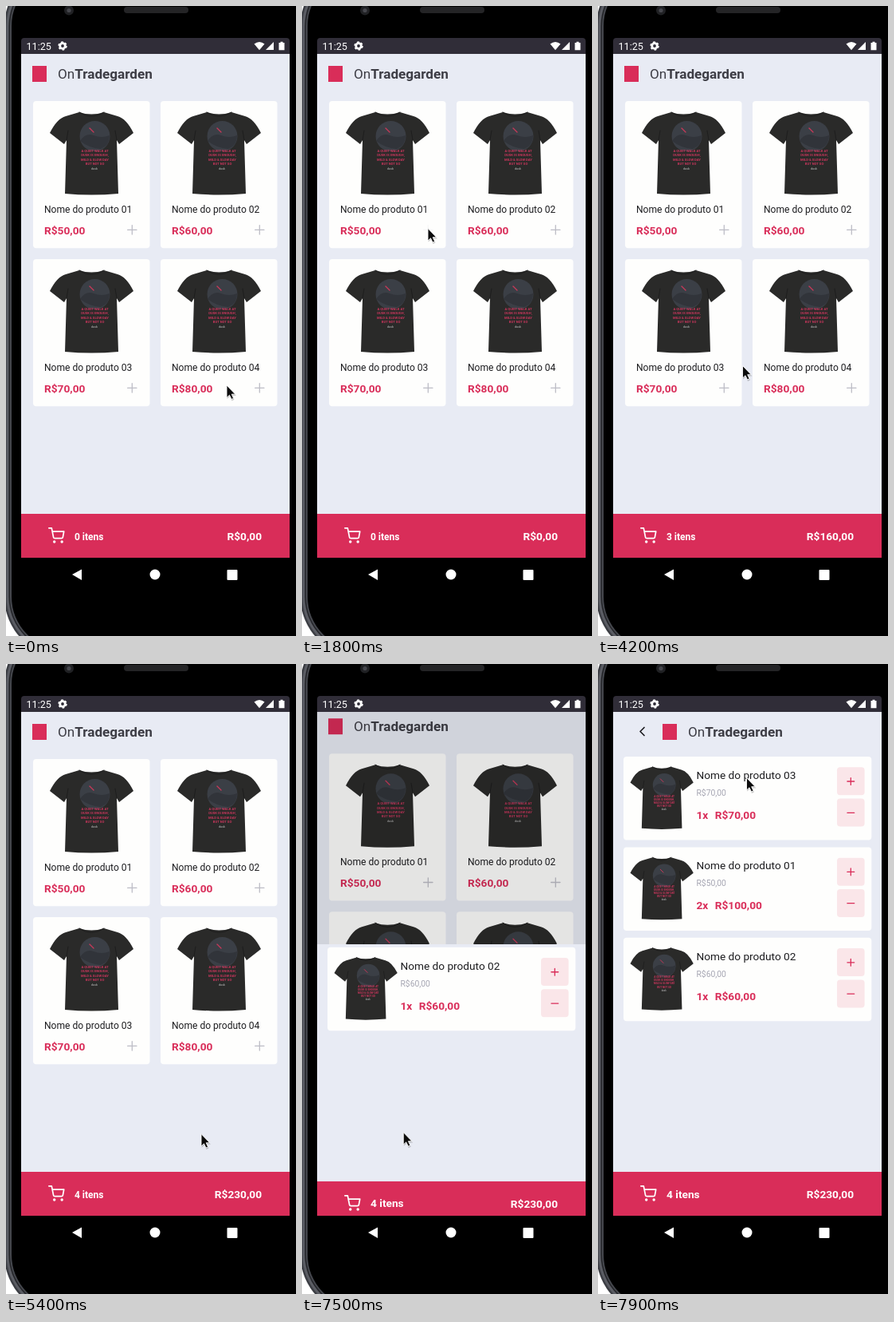
An HTML page for the animation above (8 s loop, 364x789 px).

```html
<!DOCTYPE html>
<html lang="pt-BR">
<head>
<meta charset="utf-8">
<title>Loja</title>
<style>
html, body { margin: 0; width: 100%; height: 100%; overflow: hidden; background: #fff; }
#stage { display: block; width: 364px; height: 789px; font-family: Roboto, sans-serif; }
.bold { font-weight: 700; }
.red { fill: #d92d59; }
.white { fill: #fff; }
.name { fill: #1d1d20; }
.line { fill: none; stroke-linecap: round; stroke-linejoin: round; }
</style>
</head>
<body>
<svg id="stage" viewBox="0 0 364 789" xmlns="http://www.w3.org/2000/svg"></svg>
<script>
const RED = '#d92d59', PAGE = '#e8ebf4', CARD = '#fefefd';
const LOOP = 8000, STEP = 100, LEG = 200;
const VIEW = { x: 19, y: 60, w: 337, h: 631 };

// Each stroke leaves at `start` and passes one point per LEG
const rest = [276.5, 474.5];
const strokes = [
  { start: 700, points: [[242, 414], [176, 311], [157.5, 278]] },
  { start: 2800, points: [[197, 333], [236.5, 309], [281, 287], [320, 282]] },
  { start: 4000, points: [[181, 450], [154, 474]] },
  { start: 5000, points: [[229, 540], [244.5, 588], [274, 661], [271, 661], [274, 640], [262, 470],
    [243, 387], [232, 437], [120.5, 612], [89, 673]] },
  { start: 7400, points: [[164.5, 499], [190, 220], [182, 64]] }
];
const taps = [
  { product: 0, down: 1800, up: 2300 },
  { product: 0, down: 2500, up: 2700 },
  { product: 1, down: 3900, up: 4200 },
  { product: 2, down: 4700, up: 5000 }
];
const cartPress = 7300, openCart = 7430, openTime = 425, countDelay = 200;

const price = i => 50 + 10 * i;
const money = n => `R$${n},00`;
const text = (x, y, size, cls, body, extra = '') =>
  `<text x="${x}" y="${y}" font-size="${size}" class="${cls}" ${extra}>${body}</text>`;
const box = (x, y, w, h, fill, r = 0) =>
  `<rect x="${x}" y="${y}" width="${w}" height="${h}" rx="${r}" fill="${fill}"/>`;
const cross = (x, y, r, color, upright = true) =>
  `<path class="line" stroke="${color}" stroke-width="1.3" d="M${x - r} ${y}h${2 * r}${upright ? `M${x} ${y - r}v${2 * r}` : ''}"/>`;
const shirt = (x, y, scale) => `<use href="#shirt" transform="translate(${x} ${y}) scale(${scale})"/>`;

const brand = x => box(x, 75, 18, 20, RED) +
  `<text x="${x + 32}" y="90.5" font-size="17.1" fill="#3d3d45">On<tspan class="bold">Tradegarden</tspan></text>`;

function footer(id, size) {
  return box(19, 636, 337, 60, RED) + `<g id="${id}Button">
    <g class="line" transform="translate(53 653) scale(.857)" stroke="#fff" stroke-width="2">
      <circle cx="9" cy="21" r="1"/><circle cx="20" cy="21" r="1"/>
      <path d="M1 1h4l2.68 13.39a2 2 0 0 0 2 1.61h9.72a2 2 0 0 0 2-1.61L23 6H6"/></g>` +
    text(86, 668.5, size, 'bold white', '4 itens', `id="${id}Items"`) + '</g>' +
    text(321, 669, 13.7, 'bold white', money(230), `id="${id}Total" text-anchor="end"`);
}

function product(i) {
  const x = 34 + i % 2 * 160, y = 119 + (i >> 1) * 198;
  return box(x, y, 146.5, 184.3, CARD, 4) + shirt(x + 21, y + 13, 1) +
    text(x + 14, y + 140, 12.05, 'name', `Nome do produto 0${i + 1}`) +
    text(x + 14, y + 167, 13.7, 'bold red', money(price(i))) +
    `<g id="plus${i}">${cross(x + 124.3, y + 161.3, 5.7, '#bdbdc6')}</g>`;
}

function cartRow({ item, count }, row) {
  const y = 116 + row * 113.4;
  return box(32, y, 311.3, 104.5, CARD, 4) + shirt(40.5, y + 12, .755) +
    text(123.5, y + 28, 13.65, 'name', `Nome do produto 0${item + 1}`) +
    text(123.5, y + 49, 10.3, '', money(price(item)), 'fill="#a5a5b2"') +
    text(123.5, y + 77.8, 13.7, 'bold red', count + 'x') +
    text(146.7, y + 77.8, 13.7, 'bold red', money(price(item) * count)) +
    [0, 1].map(k => box(300, y + 13.3 + k * 39.3, 34.6, 35, '#fae6e9', 4) +
      cross(317.3, y + 31 + k * 39.3, 4.4, RED, !k)).join('');
}

const slogan = ['A QUIET WALK AT', 'DUSK IS ENOUGH,', 'MILD & SLOW DAY', 'BUT NOT SO'];
const shirtArt = `<g id="shirt">
  <path fill="#2a2a29" d="M37 1Q52 6 68 1L85 6Q96 9 105 27L87 41 84 36 86 103Q52 106 19 103L21 36 18 41 0 27Q9 9 20 6Z"/>
  <path class="line" stroke="#1d1d1d" d="M37 1Q52 12 68 1M21 36L23 24M84 36L82 24"/>
  <circle cx="56.5" cy="31" r="19" fill="#3b3f46"/>
  <path fill="#31343a" d="M38 37Q45 26 55 30T75 30Q75 43 64 47 49 46 38 37Z"/>
  <path class="line" stroke="#c73959" stroke-width="1.3" d="M50 21l5 5"/>
  <g text-anchor="middle" fill="#c8365c" font-weight="700">
    ${slogan.map((s, i) => text(56.5, 51 + i * 5.4, 4.2, '', s)).join('')}
    ${text(56, 72.5, 3.6, '', 'dusk', 'fill="#999"')}</g></g>`;

// Nested outlines of the phone body, from the rim inwards
const shell = [[-2, '#3c3e44'], [.5, '#5b5d64'], [3.5, '#232428'], [5, '#45474d'], [7, '#000']]
  .map(([inset, fill]) => box(inset, -48 + inset, 460, 861 - 2 * inset, fill, 73 - inset)).join('');

const phone = `${shell}
  ${box(148, 1, 81, 8, '#242426', 4)}
  <circle cx="79" cy="5.5" r="6" fill="#202124"/><circle cx="79" cy="5.5" r="2.6" fill="#45464c"/>
  <path fill="#302d38" d="M19 60V44q0-4 4-4H352q4 0 4 4V60Z"/>
  ${text(25.5, 54.8, 12.6, 'white', '11:25')}
  <circle cx="71" cy="50" r="3.3" fill="none" stroke="#fff" stroke-width="2.8"/>
  <circle cx="71" cy="50" r="4.9" fill="none" stroke="#fff" stroke-width="1.7" stroke-dasharray="2.6 2.53"/>
  <path class="white" d="M311.5 47.5Q318 42.5 324.5 47.5L318 55.3Z"/>
  <path class="white" d="M326 55L336 45V55Z"/>
  <path class="white" d="M342.5 46h2v-1.3h3V46h2v9.3h-7Z"/>
  <path class="white" d="M83 712L95 705.5V719Z"/>
  <circle class="white" cx="187" cy="712" r="6.5"/>${box(277.5, 706, 13, 13, '#fff', 1)}`;

const frame = `width="${VIEW.w}" height="${VIEW.h}" viewBox="${VIEW.x} ${VIEW.y} ${VIEW.w} ${VIEW.h}"`;
const background = box(19, 40, 337, 680, PAGE);
const cart = [{ item: 2, count: 1 }, { item: 0, count: 2 }, { item: 1, count: 1 }];

document.getElementById('stage').innerHTML = `<defs>${shirtArt}</defs>${phone}
  <svg x="${VIEW.x}" y="${VIEW.y}" ${frame}>
    ${background}
    <g id="home">${background}${brand(33)}${[0, 1, 2, 3].map(product).join('')}${footer('home', 12)}</g>
    <rect id="shade" x="19" y="60" width="337" height="631"/>
    <svg id="reveal" x="${VIEW.x}" ${frame}><g id="cart">
      ${background}
      <path class="line" stroke="#1d1d20" stroke-width="1.7" d="M58 79.5L53 84.5 58 89.5"/>
      ${brand(81)}${cart.map(cartRow).join('')}${footer('cart', 13.7)}</g></svg>
  </svg>
  <g id="pointer">
    <path d="M1 2V17.5L4.6 14.5 7 20 10 18.6 7.7 13.5H12.5Z" opacity=".2"/>
    <path d="M.5 .5V16L4 12.8 6.5 18 9.1 16.8 6.7 11.7H11.3Z" fill="#0c0c0c" stroke="#fff" stroke-width=".9"/>
  </g>`;

const $ = id => document.getElementById(id);
const clamp = (v, max) => Math.min(max, Math.max(0, v));
const move = (id, x, y) => $(id).setAttribute('transform', `translate(${x} ${y})`);

function pointerAt(t) {
  let from = rest;
  for (const { start, points } of strokes) {
    points.forEach((to, i) => {
      const u = clamp((t - start) / LEG - i, 1);
      from = from.map((v, axis) => v + (to[axis] - v) * u);
    });
  }
  return from;
}

function draw(t) {
  move('pointer', ...pointerAt(t));

  const added = taps.filter(tap => t >= tap.down + countDelay);
  $('homeItems').textContent = `${added.length} itens`;
  $('homeTotal').textContent = money(added.reduce((sum, tap) => sum + price(tap.product), 0));
  for (let i = 0; i < 4; i++) {
    const held = taps.some(tap => tap.product === i && t >= tap.down && t < tap.up);
    $('plus' + i).setAttribute('opacity', held ? .1 : 1);
  }
  $('homeButton').setAttribute('opacity', t >= cartPress ? .25 : 1);

  // The cart is uncovered from below while its content barely shifts
  const u = clamp((t - openCart) / openTime, 1);
  const progress = 1 - (1 - u) ** 4.3;
  const offset = VIEW.h * (1 - progress);
  move('home', 0, -.02 * VIEW.h * progress);
  $('shade').setAttribute('opacity', Math.min(.1, progress * .28));
  $('reveal').setAttribute('y', VIEW.y + offset);
  $('reveal').setAttribute('visibility', u > 0 ? 'visible' : 'hidden');
  move('cart', 0, -.959 * offset);
}

function tick() {
  draw(Math.floor(performance.now() % LOOP / STEP) * STEP);
  requestAnimationFrame(tick);
}
tick();
</script>
</body>
</html>
```
